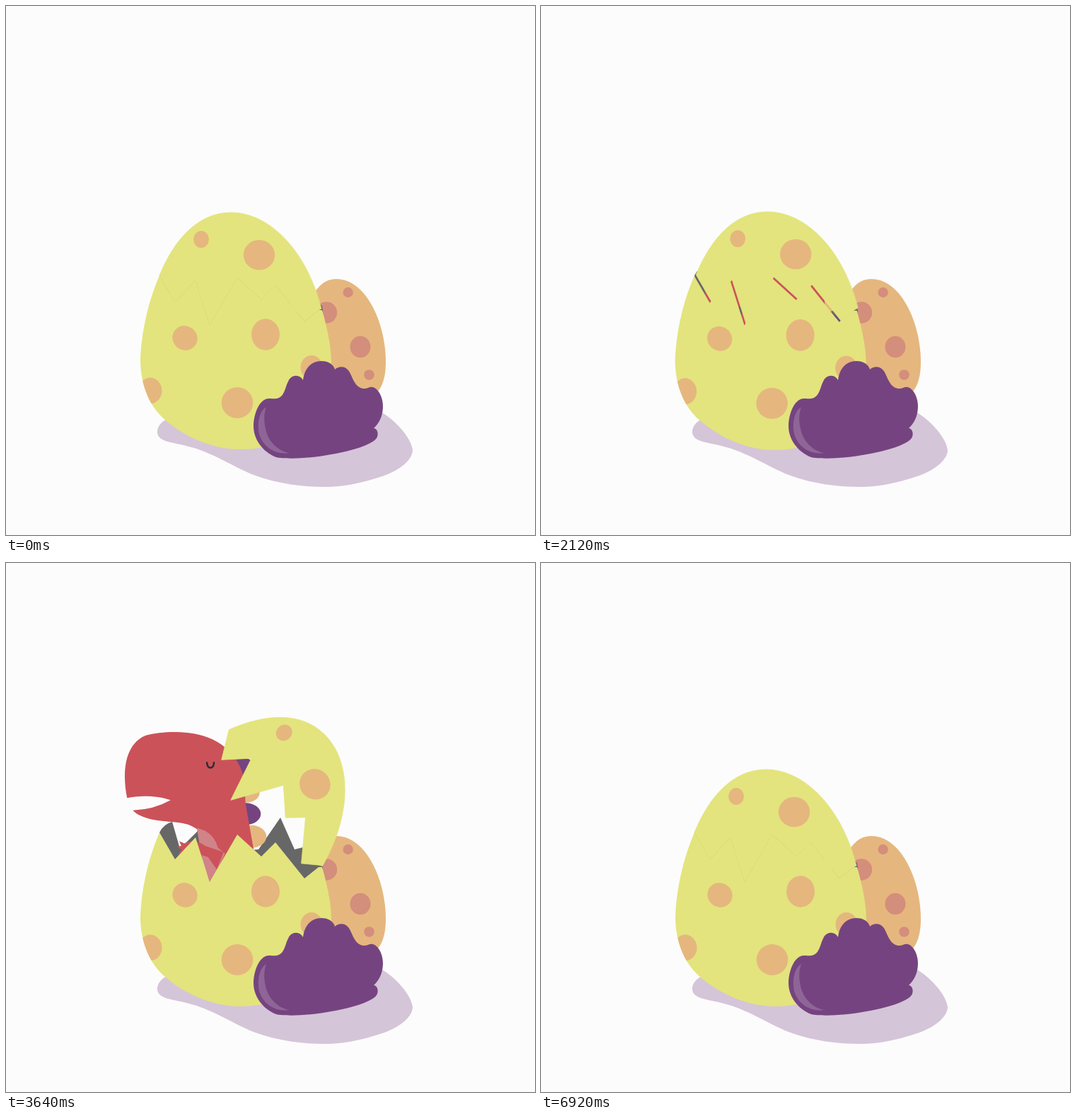
Recreate the animation shown at these times as an HTML page. Size 748 by 748 pixels, loop 7.8 s.

```html
<!DOCTYPE html>
<html lang="en">
<head>
<meta charset="utf-8">
<title>Hatching egg</title>
<style>
  html, body { margin: 0; width: 100%; height: 100%; overflow: hidden; background: #fcfcfc; }
  svg { display: block; width: 100%; height: 100%; }
  .yellow { fill: #e3e47d; }
  .orange { fill: #e5b77e; }
  .rust { fill: #d48e7c; }
  .purple { fill: #754480; }
  .red { fill: #cb5259; }
</style>
</head>
<body>
<svg viewBox="0 0 748 748">
  <defs>
    <clipPath id="shellClip">
      <path d="M217 381V500H190C190 540 206 570 226 586C250 607 290 627 330 627C410 627 460 575 460 505V381Z"/>
    </clipPath>
  </defs>

  <path fill="#d5c5d8" d="M226 585C218 589 213 597 214 604C216 616 235 617 255 622C290 630 320 651 350 663
    C385 676 420 680 452 680C485 680 510 672 535 664C560 655 575 640 575 628C573 610 550 585 530 574L400 560Z"/>

  <g id="smallEgg">
    <path class="orange" d="M467 386C510 386 537 450 537 503C537 530 530 545 515 555L440 560C410 500 415 386 467 386Z"/>
    <g class="rust">
      <circle cx="483.700" cy="405" r="7.200"/>
      <circle cx="453" cy="433.500" r="15.200"/>
      <ellipse cx="501" cy="482" rx="14.500" ry="15.200"/>
      <circle cx="513.500" cy="521.500" r="7.300"/>
    </g>
  </g>

  <path fill="#676767" d="M217 381Q223 369 235 366L246 404L272 378L300 410L357 405L388 360L408 405L420 402L447 424
    L448 431L440 470H230Z"/>

  <g id="dino">
    <g class="purple">
      <ellipse cx="330" cy="290" rx="22" ry="16"/>
      <ellipse cx="337" cy="354" rx="21.500" ry="15.500"/>
    </g>
    <g class="orange">
      <ellipse cx="337" cy="324" rx="20" ry="14"/>
      <ellipse cx="345" cy="386" rx="21.500" ry="16"/>
    </g>
    <path id="body" class="red"/>
    <path fill="#d08488" d="M268 374C285 378 293 386 298 402L308 410L288 454L276 420Z"/>
    <path id="arm" class="red" d="M250 379L256 384Q273 381 284 396L306 411L290 432L283 412Q268 401 248 399
      L244 396L250 391L245 386L251 386Z"/>
    <path id="eye" fill="none" stroke="#2d2b33" stroke-width="2.400" d="M-5-4.500C-5.500 6.500 5.500 6.500 5-4.500"/>
  </g>

  <g id="bottom">
    <path class="yellow" d="M217 381L239 419L268 388L288 451L327 384L361 415L381 395L422 446L442 430L447 430
      C456 462 460 485 460 505C460 575 410 627 330 627C290 627 250 607 226 586C206 570 190 540 190 500C191 465 200 420 217 381Z"/>
    <g class="orange" clip-path="url(#shellClip)">
      <ellipse cx="253" cy="469.500" rx="18" ry="17" transform="rotate(35 253 469.500)"/>
      <ellipse cx="367" cy="464.500" rx="20" ry="22.300"/>
      <ellipse cx="327" cy="561" rx="22.300" ry="22"/>
      <ellipse cx="432" cy="511" rx="15.500" ry="17"/>
      <ellipse cx="204" cy="544" rx="16.500" ry="18.500"/>
    </g>
  </g>

  <g id="top">
    <path class="yellow" stroke="#e3e47d" stroke-width=".8" d="M217 381C240 325 275 292 318 292C372 292 425 345 446 428
      L442 430L422 446L381 395L361 415L327 384L288 451L268 388L239 419Z"/>
    <g class="orange">
      <ellipse cx="276" cy="330" rx="10.800" ry="12"/>
      <ellipse cx="358" cy="352" rx="22.200" ry="21.300"/>
    </g>
  </g>

  <path class="purple" d="M374 555C382 556 388 555 392 548C396 541 396 536 399 531C403 521 415 520 420 529
    C422 512 432 502 446 502C456 502 463 507 465 514C472 508 482 509 487 520C492 531 496 541 507 541
    C512 541 513 538 519 539C528 542 533 555 533 566C533 580 527 591 520 597C526 598 527 606 524 611
    C518 620 490 629 460 634C430 640 395 641 382 638C362 630 350 612 350 594C350 578 358 553 374 555Z"/>
  <path fill="#8f6598" d="M368 567C358 573 355 590 358 605C363 623 380 635 401 632C385 630 370 615 367 598C364 585 365 575 368 567Z"/>
</svg>
<script>
  const LOOP = 7800, STEP = 40;
  const part = id => document.getElementById(id);
  const [dino, body, arm, eye, bottom, top_] = ['dino', 'body', 'arm', 'eye', 'bottom', 'top'].map(part);

  const ramp = (t, from, to) => Math.min(1, Math.max(0, (t - from) / (to - from)));
  const smooth = u => u * u * (3 - 2 * u);
  const mix = (a, b, u) => (a + (b - a) * u).toFixed(2);
  const move = (el, value) => el.setAttribute('transform', value);

  // look: 0 = smiling, 1 = facing left with the mouth straight
  function bodyPath(look) {
    const m = (a, b) => mix(a, b, look);
    return `M${m(169.5, 168)} ${m(331.5, 329)}C162 295 166 255 196 243C225 236 280 233 310 262
      C322 271 331 288 335 304Q336 322 337 340L348 402L352 460H284L276 420
      Q284 398 270 377Q257 367 240 366C215 364 190 362 ${m(177.5, 176)} ${m(349, 347)}
      Q${m(207, 212)} ${m(348, 344)} 231 334.500C${m(212, 212)} ${m(328, 332.5)} ${m(187, 187)} ${m(327.5, 330)}
      ${m(169.5, 168)} ${m(331.5, 329)}Z`;
  }

  function draw(t) {
    const shake = Math.sin(ramp(t, 680, 2640) * Math.PI * 14);
    const lift = Math.abs(shake);
    const shut = smooth(ramp(t, 6440, 6920));
    const lid = (1 - (1 - ramp(t, 3080, 3600)) ** 3) * (1 - shut);
    const inside = 1 - ramp(t, 3080, 3880);
    const dx = 65 * Math.max(inside ** 3, shut);
    const dy = 95 * Math.max(inside ** 4, shut);

    const turn = smooth(ramp(t, 3880, 4640));
    const look = turn - smooth(ramp(t, 5000, 6200));
    const gaze = turn - smooth(ramp(t, 5000, 5900));

    move(top_, `translate(${2.8 * shake} ${-1.3 * lift}) rotate(${44 * lid} 446 430)`);
    move(bottom, `translate(${-.5 * shake} ${1.1 * lift})`);
    move(dino, `translate(${dx} ${dy})`);
    move(arm, `rotate(${-16 * (1 - look)} 295 410)`);
    move(eye, `translate(${mix(287.3, 268.5, gaze)} ${285 - 6 * gaze * (1 - gaze)})`);
    body.setAttribute('d', bodyPath(look));
  }

  const start = performance.now();
  function tick(now) {
    const t = Math.max(0, now - start) % LOOP;
    draw(Math.floor(t / STEP) * STEP);
    requestAnimationFrame(tick);
  }
  draw(0);
  requestAnimationFrame(tick);
</script>
</body>
</html>
```
